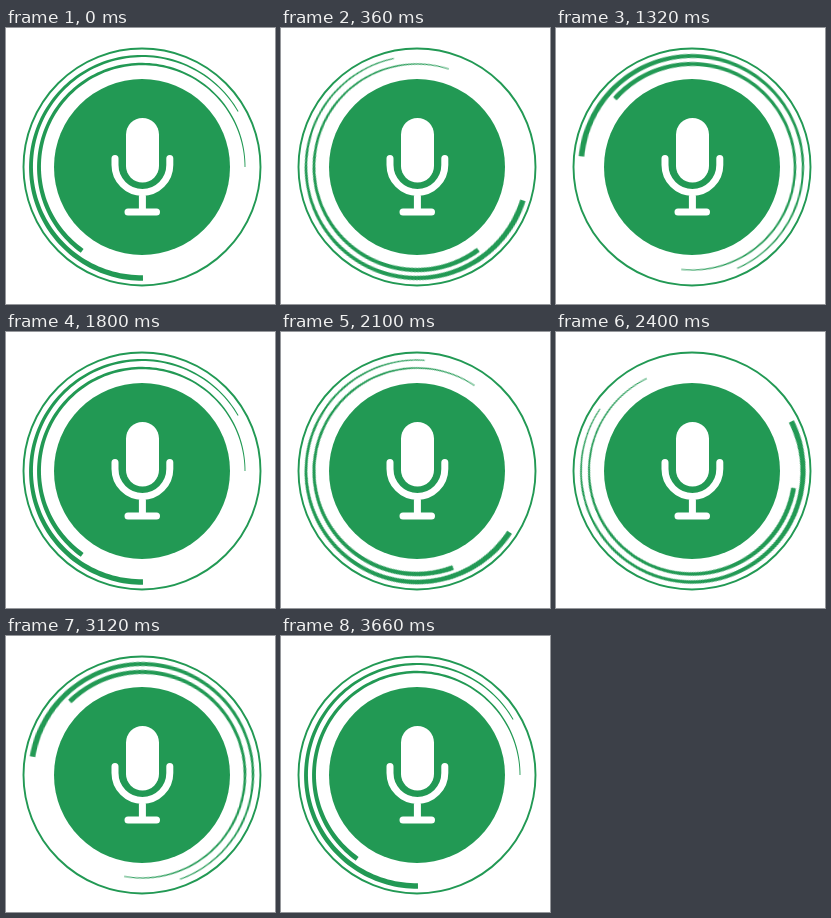
Recreate the animation shown at these times as an HTML page. Size 269x276 px, loop 4660 ms.

```html
<!DOCTYPE html>
<html lang="en">
<head>
<meta charset="utf-8">
<title>Microphone</title>
<style>
  html, body { margin: 0; width: 100%; height: 100%; overflow: hidden; background: #fff; }
  svg { display: block; width: 269px; height: 276px; }
  .green { fill: #229954; }
  .ring { fill: none; stroke: #229954; stroke-width: 1.9; }
  .line { fill: none; stroke: #fff; stroke-width: 7; stroke-linecap: round; }
  #swirl {
    transform-origin: 136px 139px;
    animation: spin 4660ms -3ms infinite;
  }
  /* two turns in 60 ms ticks, 12 degrees each, then a one second rest */
  @keyframes spin {
    0% { transform: rotate(0deg); animation-timing-function: steps(30, end); }
    38.626609% { transform: rotate(-360deg); animation-timing-function: steps(1, end); }
    39.914163% { transform: rotate(-368deg); animation-timing-function: steps(29, end); }
    77.253219% { transform: rotate(-716deg); animation-timing-function: steps(1, end); }
    78.540773%, 100% { transform: rotate(-720deg); }
  }
</style>
</head>
<body>
<svg viewBox="0 0 269 276">
  <circle class="ring" cx="136" cy="139" r="118.5"/>
  <g id="swirl" class="green"></g>
  <circle class="green" cx="136" cy="139" r="88"/>
  <rect x="120" y="90" width="33" height="64.5" rx="16.5" fill="#fff"/>
  <path class="line" d="M109 130.5V137A27.4 27.4 0 0 0 163.8 137V130.5M136.4 165V184M122 184H150.5"/>
</svg>
<script>
  const swirl = document.getElementById('swirl');

  // Arc band whose width shrinks evenly from its start to its end
  function taper(radius, from, to, wide, thin) {
    const outer = [], inner = [];
    const count = 120;
    for (let i = 0; i <= count; i++) {
      const k = i / count;
      const angle = (from + (to - from) * k) * Math.PI / 180;
      const half = (wide + (thin - wide) * k) / 2;
      const at = r => (136 + r * Math.cos(angle)).toFixed(2) + ' ' + (139 + r * Math.sin(angle)).toFixed(2);
      outer.push(at(radius + half));
      inner.unshift(at(radius - half));
    }
    const path = document.createElementNS('http://www.w3.org/2000/svg', 'path');
    path.setAttribute('d', 'M' + outer.concat(inner).join('L') + 'Z');
    swirl.append(path);
  }

  taper(111, 89.5, 330, 5.6, 1);
  taper(103, 125.5, 360, 4.8, 0.9);
</script>
</body>
</html>
```
